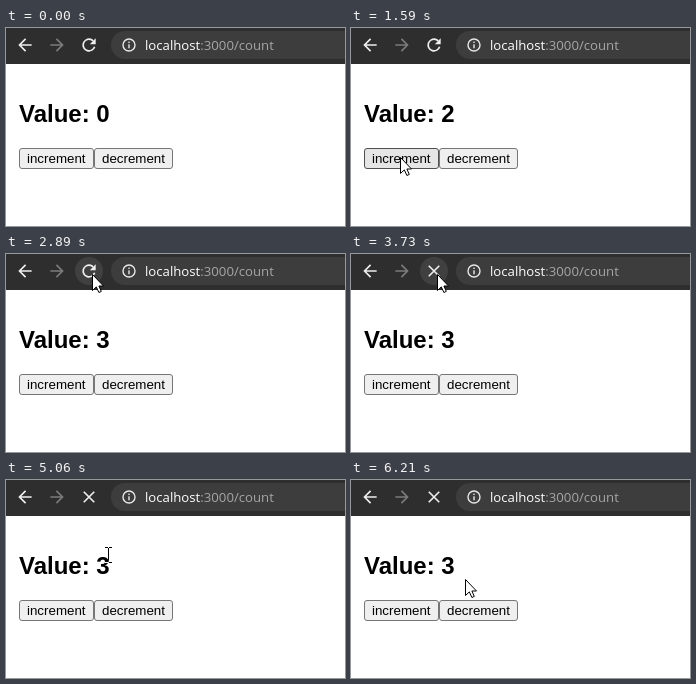
Animation, 339 px wide and 198 px high, one loop 8000 ms. Source, as an HTML page with a canvas:

```html
<!DOCTYPE html>
<html lang="en">
<head>
<meta charset="utf-8">
<title>Counter</title>
<style>
  html, body { margin: 0; width: 100%; height: 100%; overflow: hidden; background: #fff; }
  canvas { display: block; width: 100vw; height: 100vh; }
</style>
</head>
<body>
<canvas id="stage"></canvas>
<script>
const W = 339, H = 198, LOOP = 8000;
const canvas = document.getElementById('stage');
const ctx = canvas.getContext('2d');

// Pointer path: time, x, y
const path = [
  [770, 88, 186], [880, 68, 160], [1000, 53, 136], [1080, 49, 129],
  [2210, 49, 129], [2290, 58, 108], [2380, 73, 74], [2500, 84, 42], [2660, 91, 22],
  [2889, 91, 22], [2890, 86, 20],
  [3800, 86, 20], [4150, 87, 36], [4520, 89, 63], [4600, 98, 72], [4650, 102, 74],
  [5059, 102, 74], [5060, 102, 75], [5110, 102, 75], [5450, 106, 84], [5850, 110, 93],
  [5899, 110, 93], [5950, 112, 95], [6129, 112, 95], [6210, 114, 99]
];
const presses = [[1280, 1360], [1510, 1590], [1790, 1870]];
const RIPPLE = 3120, LOADING = 3730;

const arrowIcon = new Path2D('M20 12H5.4M12.7 4.7L5.4 12l7.3 7.3');
const crossIcon = new Path2D('M5.7 5.7L18.3 18.3M18.3 5.7L5.7 18.3');
const reloadHead = new Path2D('M13 11h7V4z');
const reloadArc = new Path2D();
reloadArc.arc(12, 12, 7, 0.29, -0.78);
const arrowCursor = new Path2D('M.5.5V16.5L4.3 12.9L6.9 18.5L9.3 17.4L6.9 12H11.5Z');

function pointerAt(t) {
  if (t < path[0][0]) return null;
  const i = path.findIndex(k => k[0] > t);
  if (i < 0) return { x: path.at(-1)[1], y: path.at(-1)[2] };
  const [t0, x0, y0] = path[i - 1], [t1, x1, y1] = path[i];
  const f = (t - t0) / (t1 - t0);
  return { x: Math.round(x0 + (x1 - x0) * f), y: Math.round(y0 + (y1 - y0) * f) };
}

function inside(p, x, y, w, h) {
  return !!p && p.x >= x && p.x < x + w && p.y >= y && p.y < y + h;
}

function disc(x, y, r, color) {
  ctx.fillStyle = color;
  ctx.beginPath();
  ctx.arc(x, y, r, 0, Math.PI * 2);
  ctx.fill();
}

function text(str, x, y, font, color) {
  ctx.font = font;
  ctx.fillStyle = color;
  ctx.fillText(str, x, y);
}

function icon(x, y, color, draw, flip = 1) {
  const s = 20 / 24;
  ctx.save();
  ctx.translate(x, y);
  ctx.scale(s * flip, s);
  ctx.translate(-12, -12);
  ctx.strokeStyle = ctx.fillStyle = color;
  ctx.lineWidth = 2;
  draw();
  ctx.restore();
}

function drawToolbar(t, p) {
  ctx.fillStyle = '#2e2e2e';
  ctx.fillRect(0, 0, W, 36);

  if (p && Math.hypot(p.x - 83, p.y - 17) <= 14) disc(83, 17, 14, 'rgba(255,255,255,.09)');
  if (t >= RIPPLE && t < LOADING) {
    const grow = Math.min(1, (t - RIPPLE + 50) / 150);
    const fade = 1 - Math.max(0, t - 3220) / (LOADING - 3220);
    disc(86, 20, 12 * grow, `rgba(255,255,255,${0.08 * fade})`);
  }

  icon(19, 17, '#eeeeee', () => ctx.stroke(arrowIcon));
  icon(51, 17, '#7c7c7c', () => ctx.stroke(arrowIcon), -1);
  icon(83, 17, '#eeeeee', () => {
    if (t >= LOADING) return ctx.stroke(crossIcon);
    ctx.stroke(reloadArc);
    ctx.fill(reloadHead);
  });

  ctx.fillStyle = '#3d3d3d';
  ctx.beginPath();
  ctx.roundRect(105, 3, W, 28, 14);
  ctx.fill();

  ctx.strokeStyle = '#e8e8e8';
  ctx.lineWidth = 1.4;
  ctx.beginPath();
  ctx.arc(123, 17, 6, 0, Math.PI * 2);
  ctx.stroke();
  ctx.fillStyle = '#e8e8e8';
  ctx.fillRect(122.3, 16.3, 1.4, 4);
  ctx.fillRect(122.3, 13.6, 1.4, 1.4);

  const font = '13.2px "Open Sans", "Noto Sans", sans-serif';
  text('localhost', 139, 22, font, '#ffffff');
  text(':3000/count', 139 + ctx.measureText('localhost').width, 22, font, '#a6a6a6');
}

function drawButton(label, x, w, hover, down) {
  const [fill, edge] = down ? ['#f5f5f5', '#8d8d8d'] : hover ? ['#e5e5e5', '#4f4f4f'] : ['#efefef', '#767676'];
  ctx.beginPath();
  ctx.roundRect(x + 0.5, 120.5, w - 1, 20, 2.5);
  ctx.fillStyle = fill;
  ctx.fill();
  ctx.strokeStyle = edge;
  ctx.lineWidth = 1;
  ctx.stroke();
  text(label, x + 8, 135, '13.333px "Liberation Sans", Arial, sans-serif', '#000');
}

function drawPointer(p) {
  ctx.save();
  ctx.translate(p.x, p.y);
  if (inside(p, 13, 73, 91, 27) && p.x < 103) {
    // Text beam inverts what lies below it
    ctx.globalCompositeOperation = 'difference';
    ctx.fillStyle = '#fff';
    ctx.fillRect(0, -7, 1, 14);
    for (const y of [-8, 7]) {
      ctx.fillRect(-3, y, 3, 1);
      ctx.fillRect(1, y, 3, 1);
    }
  } else {
    ctx.fillStyle = '#fff';
    ctx.strokeStyle = '#000';
    ctx.lineWidth = 1;
    ctx.fill(arrowCursor);
    ctx.stroke(arrowCursor);
  }
  ctx.restore();
}

function draw(t) {
  const p = pointerAt(t);
  const count = presses.filter(([, up]) => t >= up).length;
  const down = presses.some(([on, up]) => t >= on && t < up);

  ctx.fillStyle = '#fff';
  ctx.fillRect(0, 0, W, H);
  drawToolbar(t, p);
  text('Value: ' + count, 13, 94, 'bold 24px "Liberation Sans", Arial, sans-serif', '#000');
  drawButton('increment', 13, 75, inside(p, 13, 120, 75, 21), down);
  drawButton('decrement', 88, 79, inside(p, 88, 120, 79, 21), false);
  if (p) drawPointer(p);
}

function resize() {
  const ratio = window.devicePixelRatio || 1;
  canvas.width = Math.round(W * ratio);
  canvas.height = Math.round(H * ratio);
  ctx.setTransform(ratio, 0, 0, ratio, 0, 0);
}

const start = performance.now();
function tick() {
  draw((performance.now() - start) % LOOP);
  requestAnimationFrame(tick);
}

window.addEventListener('resize', resize);
resize();
tick();
</script>
</body>
</html>
```
